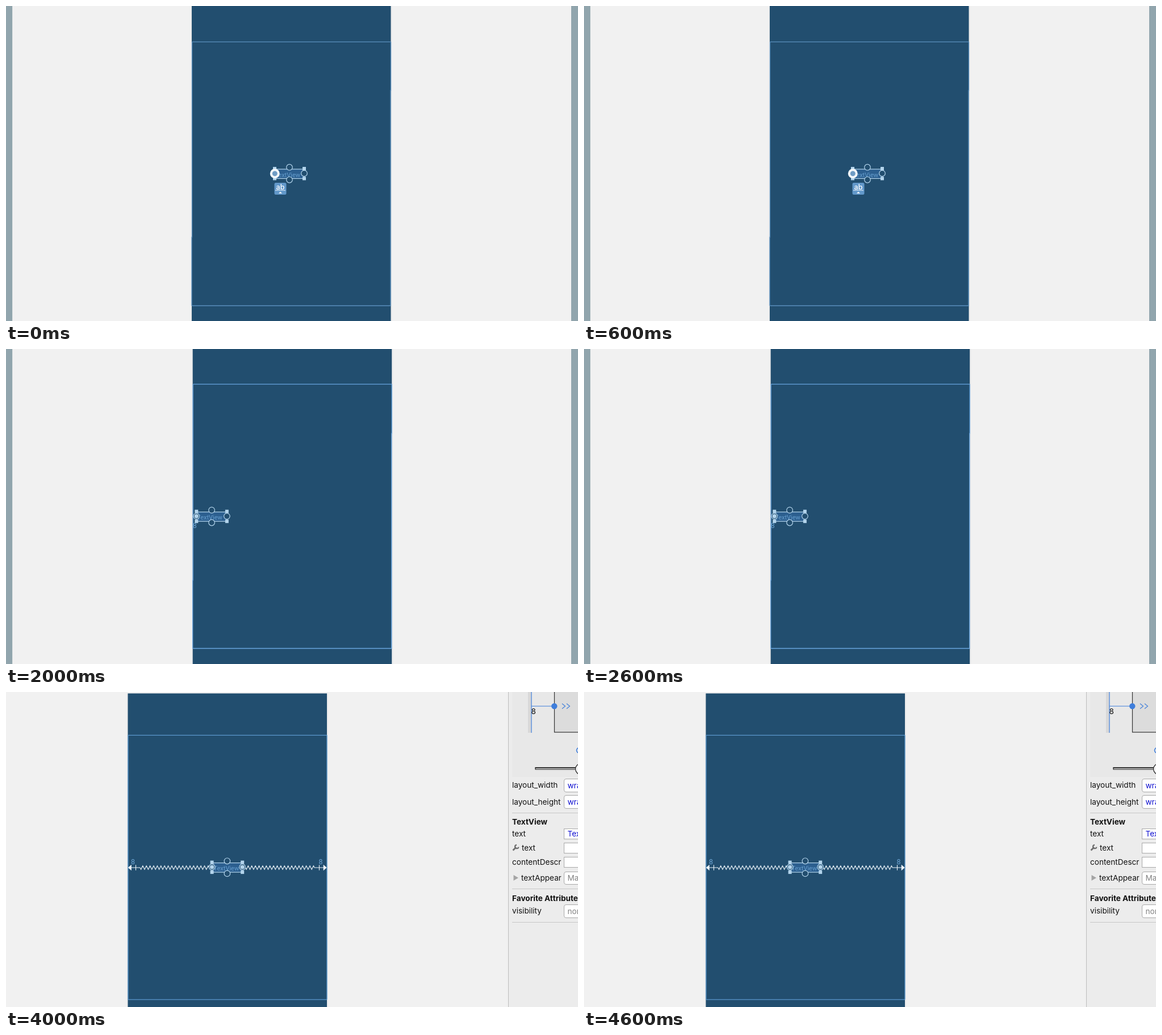
Recreate the animation shown at these times as an HTML page. Size 1007 by 556 pixels, loop 5 s.

```html
<!DOCTYPE html>
<html lang="en">
<head>
<meta charset="utf-8">
<title>Constraint editor</title>
<style>
html, body { margin: 0; width: 100%; height: 100%; overflow: hidden; background: #f1f1f1; }
svg { display: block; width: 100%; height: 100%; }
.tag { font: 11px Roboto, Arial, sans-serif; fill: #659dcd; }
.gap { font: 12.5px Roboto, Arial, sans-serif; fill: #6ea6d5; }
.ui { font: 13.6px Inter, "Open Sans", sans-serif; fill: #111; }
.bold { font-weight: 700; }
</style>
</head>
<body>
<svg id="stage" viewBox="0 0 1007 556" preserveAspectRatio="none"></svg>
<script>
const stage = document.getElementById('stage');
const NAVY = '#224e6f', PALE = '#b3d4ec', WHITE = '#eef6fc', EDGE = '#5b97cd', BAR = '#91a5ad';
const HOLD = 1000;

const rect = (x, y, w, h, fill, more = '') =>
  `<rect x="${x}" y="${y}" width="${w}" height="${h}" fill="${fill}" ${more}/>`;
const path = (d, color, width = 1, fill = 'none') =>
  `<path d="${d}" fill="${fill}" stroke="${color}" stroke-width="${width}"/>`;
const shape = (d, fill) => `<path d="${d}" fill="${fill}"/>`;
const disc = (x, y, r, fill, stroke = 'none', width = 1.2) =>
  `<circle cx="${x}" cy="${y}" r="${r}" fill="${fill}" stroke="${stroke}" stroke-width="${width}"/>`;
const text = (x, y, label, cls, more = '') =>
  `<text x="${x}" y="${y}" class="${cls}" ${more}>${label}</text>`;

// Blueprint sheet with the layout outline; step is where its sides shift by a pixel
function sheet(x, top, bottom, { y = 0, edge = EDGE, step = false } = {}) {
  const l = x + .5, r = x + 350.5;
  const sides = step
    ? `M${l} ${top}V408H${l - .5}V${bottom}M${r} ${top}V149H${r - .5}V${bottom}`
    : `M${l} ${top}V${bottom}M${r} ${top}V${bottom}`;
  return rect(x - 2, y, 354.5, 556, '#e9eaeb') + rect(x, y, 350.5, 556, NAVY) +
    path(`M${l} ${top}H${r}M${l} ${bottom}H${r}${sides}`, edge, 1.3);
}

function anchor(x, y, on) {
  return disc(x, y, 5.3, NAVY, PALE) + (on ? disc(x, y, 3.6, PALE) : '');
}

function widget(x, y, w, { left = false, right = false, inset = 7 } = {}) {
  const r = x + w, mid = x + w / 2, b = y + 16.5;
  const grips = [[x, y - 1], [r, y - 1], [x, b], [r, b]]
    .map(([cx, cy]) => rect(cx - 3, cy - 3, 6, 6, PALE)).join('');
  return rect(x, y, w, 16.5, '#2c5f8f', `stroke="${PALE}" stroke-width="1.2"`) +
    text(r - inset, y + 13.5, 'TextView', 'tag', 'text-anchor="end"') + grips +
    anchor(mid, y - 3.3, false) + anchor(mid, y + 18.8, false) +
    anchor(x, y + 7.4, left) + anchor(r, y + 7.4, right);
}

function head(x, y, dir) {
  return shape(`M${x} ${y}l${-6 * dir} -5.2v10.4z`, WHITE);
}

function bars(l, r) {
  return rect(0, 0, l, 556, BAR) + rect(r, 0, 1007 - r, 556, BAR) +
    path(`M${l + .5} 0V556`, '#e2e5e6');
}

function spring(from, to, y) {
  const turns = 19, half = (to - from) / turns / 2;
  let d = `M${from} ${y}`;
  for (let i = 0; i < turns * 2; i++) d += `L${from + half * (i + .5)} ${y + (i % 2 ? -3.3 : 3.3)}`;
  return path(d + `L${to} ${y}`, WHITE, 1.1);
}

function badge(x, y) {
  return rect(x, y, 21, 21, '#6298ca', 'rx="2.5"') +
    text(x + 10.5, y + 11.5, 'ab', 'ui', 'text-anchor="middle" style="font-size:12.5px;font-weight:500;fill:#fff"') +
    `<path d="M${x + 2} ${y + 13.3}h17" stroke="#fff" stroke-width="1.2" stroke-dasharray="2 1"/>` +
    shape(`M${x + 10.5} ${y + 15.7}l3 3h-6z`, '#fff');
}

function field(y, h, label, color, round) {
  return rect(982.5, y + .5, 40, h, '#fff', `rx="${round ? 3.5 : 0}" stroke="#a9a9a9"`) +
    text(988.5, y + h / 2 + 5.2, label, 'ui', `style="fill:${color}"`);
}

function inspector() {
  const blue = '#3f7edb', ink = '#1010d0', gray = '#828282';
  const labels = [[891, 169, 'layout_width'], [891, 199, 'layout_height'], [891, 255, 'text'],
    [908, 280, 'text'], [891, 305, 'contentDescr'], [907, 333, 'textAppear'], [891, 391, 'visibility']];
  const fields = [[153, 23, 'wrap', ink, 1], [182, 23, 'wrap', ink, 1], [241, 18, 'TextView', ink],
    [266, 18, '', ink], [291, 18, '', ink], [317, 22, 'Material', gray, 1], [375, 23, 'none', gray, 1]];
  return rect(884, 0, 123, 556, '#ececec') + path('M884.5 0V556', '#bdbdbd') +
    rect(891, 0, 116, 150, '#e8e8e8') +
    rect(919, 0, 6, 72, '#d8d8d8') +
    rect(965.5, -2, 60, 73, '#dcdcdc', 'stroke="#333" stroke-width="1.2"') +
    path('M925 0V72M925 25H965', blue, 1.2) + disc(965.3, 25, 5.2, blue) +
    path('M979 20.5l5.5 4.5l-5.5 4.5M987 20.5l5.5 4.5l-5.5 4.5', blue, 1.1) +
    text(924.5, 38.5, '8', 'ui') +
    disc(1009, 103, 4.5, 'none', blue, 1.6) +
    rect(932, 133.3, 80, 3.4, '#fff', 'stroke="#111" stroke-width="1"') + path('M931.5 134H1010', '#111', 1.6) +
    disc(1012, 136, 9.5, '#f3f3f3', '#222') +
    path('M891 213.5H1007M891 347.5H1007M891 406.5H1007', '#c6c6c6') +
    labels.map(([x, y, s]) => text(x, y, s, 'ui')).join('') +
    rect(977.5, 286, 5, 60, '#ececec') +
    text(891, 234, 'TextView', 'ui bold') + text(891, 368.5, 'Favorite Attributes', 'ui bold') +
    shape('M893.5 323l8.5 5l-8.5 5z', '#a4a4a4') +
    path('M892.5 279.5l5.5 -5.5', '#707070', 2.8) +
    path('M899 269.8a3.2 3.2 0 1 0 3.4 3.8', '#707070', 2.3) +
    fields.map(f => field(...f)).join('');
}

const scenes = [
  () => bars(11, 995) + sheet(327, 63.3, 529, { edge: '#5a8fbd', step: true }) +
    widget(473, 288, 52) +
    disc(473.3, 295.8, 6.5, '#6f9cc4', '#f4f8fb', 4) + badge(472.5, 312),

  () => bars(11, 996) + sheet(329.5, 65, 530.8) +
    widget(475.3, 290, 52.6) +
    path('M475 297.2L341 298.3', WHITE, 1.4) + head(335.6, 298.3, -1),

  () => bars(11, 995) + sheet(328.7, 62.2, 528.5, { edge: '#68a5df', step: true }) +
    path('M329 295.5H331', PALE) + text(328.7, 316, '8', 'gap') +
    widget(335.3, 287.7, 53.6, { left: true, inset: 8 }),

  () => bars(6.5, 1001) + rect(995, 0, 6, 556, '#f7f7f7') + path('M995.5 0V556', '#cbcbcb') +
    rect(996, 49, 5, 20, '#d2d3d3') +
    sheet(326.2, 60, 526, { edge: '#5490c4' }) +
    path('M326.5 293.5H328.5', PALE) + text(326, 313.7, '8', 'gap') +
    widget(332.7, 285.4, 53.5, { left: true, inset: 8 }) +
    path('M386 292.9H484V292.1H661', WHITE, 1.4) + head(666, 292, 1),

  () => sheet(214.5, 76.3, 542.8, { y: 2.5 }) +
    path('M220 310H236M543 310H560M228.5 305.3V314.7M551.5 305.3V314.7', WHITE, 1.1) +
    spring(236, 357.5, 310) + spring(421.5, 543, 310) +
    head(214.8, 310, -1) + head(564.7, 310, 1) +
    text(220, 304, '8', 'gap') + text(550.5, 304, '8', 'gap') +
    widget(362.6, 301.6, 53.6, { left: true, right: true, inset: 6 }) + inspector()
];

let shown = -1;
const start = performance.now();

function render(now) {
  const i = Math.floor(Math.max(0, now - start) / HOLD) % scenes.length;
  if (i !== shown) {
    stage.innerHTML = rect(0, 0, 1007, 556, '#f1f1f1') + scenes[i]();
    shown = i;
  }
  requestAnimationFrame(render);
}
render(start);
</script>
</body>
</html>
```
